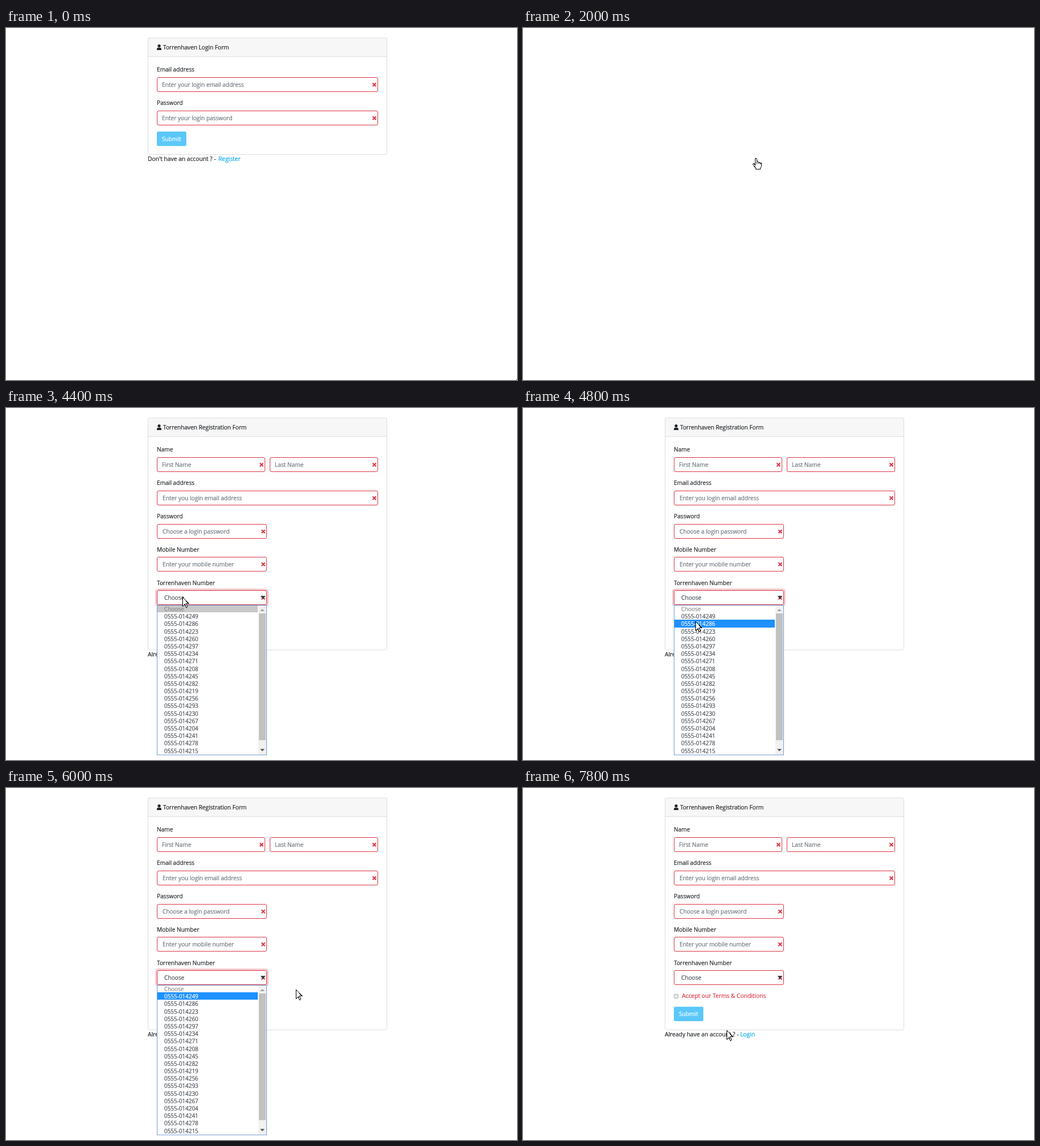
An HTML page that plays this animation: 901 by 622 pixels, repeating every 8000 ms.

```html
<!DOCTYPE html>
<html lang="en">
<head>
<meta charset="utf-8">
<title>Login and registration</title>
<style>
html, body { margin: 0; width: 100%; height: 100%; overflow: hidden; background: #fff; }
svg { display: block; }
text {
  font: 10.2px "Open Sans", "Noto Sans", sans-serif; white-space: pre;
  color: #212529; fill: currentColor; stroke: currentColor; stroke-width: .2px;
}
.card { fill: #fff; stroke: #dfdfdf; }
.head { fill: #f7f7f7; stroke: #dfdfdf; }
.field { fill: #fff; stroke: #dc3545; }
.cross { fill: none; stroke: #dc3545; stroke-width: 2; }
.hint { color: #6c757d; }
.value { color: #495057; }
.error { color: #dc3545; font-size: 10.3px; }
.link { color: #03a9f4; font-size: 10.3px; }
.link.hover { color: #0275a8; text-decoration: underline; }
.foot { font-size: 10.3px; }
.button { fill: #5bc7fa; }
.button + text { color: #fff; }
.ring { fill: none; stroke: #dc3545; stroke-opacity: .25; stroke-width: 3; }
.row text { color: #495057; font-size: 9.95px; }
.row rect { fill: none; }
.row.first text { color: #8a8a8a; }
.row.on rect { fill: #1e90ff; }
.row.on text { color: #fff; }
.row.first.on rect { fill: #c8c8c8; }
.row.first.on text { color: #8a8a8a; }
.pointer path { fill: #fff; stroke: #000; stroke-linejoin: round; shape-rendering: crispEdges; }
.pointer .line { fill: none; }
</style>
</head>
<body>
<svg id="stage" width="901" height="622" viewBox="0 0 901 622"></svg>
<script>
const BRAND = 'Torrenhaven';
const LOOP = 8000, STEP = 200;
const ROW_TOP = 348.52, ROW_HEIGHT = 13.1875, ROWS = 20;

const text = (x, y, s, cls = '') => `<text x="${x}" y="${y}" class="${cls}">${s}</text>`;
const rect = (x, y, w, h, cls, r = 0) =>
  `<rect x="${x}" y="${y}" width="${w}" height="${h}" rx="${r}" class="${cls}"/>`;
const cross = (x, y) => `<path class="cross" d="M${x - 3} ${y - 3}l6 6m0-6l-6 6"/>`;

const card = (bottom, title) =>
  rect(250.5, 17.5, 421, bottom - 17.5, 'card', 3) +
  '<path class="head" d="M250.5 50.5V20.5q0-3 3-3H668.5q3 0 3 3V50.5Z"/>' +
  '<circle cx="270" cy="31.6" r="2.6" fill="#212529"/>' +
  '<path d="M266 39v-1.6q0-2.6 2.6-2.6h2.8q2.6 0 2.6 2.6V39Z" fill="#212529"/>' +
  text(277, 38, `${BRAND} ${title} Form`);

const field = (x, y, right, hint, indent = 10, cls = 'hint') =>
  rect(x + .5, y + .5, right - x - 1 + .5 * 0, 25, 'field', 2.5) +
  text(x + indent, y + 17, hint, cls) + cross(right - 6.5, y + 13.2);

const button = y => rect(266, y, 52, 25.5, 'button', 2.5) + text(275, y + 16.5, 'Submit');

const login =
  card(223.5, 'Login') +
  text(266, 77, 'Email address') + field(266, 87, 656, 'Enter your login email address', 9) +
  text(266, 136, 'Password') + field(266, 146, 656, 'Enter your login password', 9) +
  button(183) +
  text(250, 235, "Don't have an account ? -", 'foot') +
  '<text id="register" x="374.5" y="235" class="link">Register</text>';

const registration =
  card(427.5, 'Registration') +
  text(266, 77, 'Name') + field(266, 87, 457, 'First Name', 9) + field(465, 87, 656, 'Last Name', 9) +
  text(266, 136, 'Email address') + field(266, 146, 656, 'Enter you login email address') +
  text(266, 195, 'Password') + field(266, 205, 460, 'Choose a login password') +
  text(266, 254, 'Mobile Number') + field(266, 263, 460, 'Enter your mobile number') +
  text(266, 313, `${BRAND} Number`) +
  '<g id="focus">' + rect(264.5, 320.5, 197, 29, 'ring', 4) + '</g>' +
  field(266, 322, 460, 'Choose', 13, 'value') +
  '<path d="M449 332h8l-4 6z" fill="#343a40"/>' +
  '<rect x="266.5" y="364.5" width="7" height="7" rx="1" fill="#e8e8e8" stroke="#a9a9a9"/>' +
  text(280.3, 371, 'Accept our Terms &amp; Conditions', 'error') +
  button(386.5) +
  text(250, 439, 'Already have an account ? -', 'foot') + text(383, 439, 'Login', 'link');

const number = i => '0555-014' + (200 + (i * 37 + 12) % 100);
const rowTop = i => Math.floor(ROW_TOP + i * ROW_HEIGHT);
const row = i => {
  const y = rowTop(i);
  return `<g class="row ${i ? '' : 'first'}">` + rect(267, y, 177, rowTop(i + 1) - y, '') +
    text(279, y + 11, i ? number(i) : 'Choose') + '</g>';
};
const list =
  '<path d="M266 348h194v265.5h-194z" fill="#fff"/>' +
  Array.from({ length: ROWS }, (_, i) => row(i)).join('') +
  '<path d="M445 349h14v263.5h-14z" fill="#f1f1f1"/>' +
  '<path d="M446 363h12v224h-12z" fill="#c1c1c1"/>' +
  '<path d="M448 359h8l-4-4z" fill="#a3a3a3"/><path d="M448 602.5h8l-4 4z" fill="#505050"/>' +
  '<rect x="266.5" y="348.5" width="193" height="264.5" fill="none" stroke="#6f9ad6"/>';

const pointers = {
  arrow: '<path d="M.5.5V16.2L4.2 12.7 6.7 18.5 9 17.5 6.5 11.8H11.3Z"/>',
  hand: '<path d="M4.5 12.5V1.8Q4.5.5 5.7.5T7 1.8V6.4Q9.7 5.2 10 7.4 12.6 6.3 13 8.5 15.5 7.6 15.5 10V14L13.8 17.3V19.5H5.8V17.8L1.2 12.3Q-.2 10.2 1.4 9.7T4.5 12.5Z"/>' +
    '<path class="line" d="M7 6.4V10M10 7.4V10.4M13 8.5V11"/>',
  beam: '<path class="line" d="M-3-6.5h2l1 1 1-1h2M0-5.5v11M-3 6.5h2l1-1 1 1h2"/>'
};

document.getElementById('stage').innerHTML =
  `<g id="login">${login}</g><g id="registration">${registration}</g><g id="list">${list}</g>` +
  Object.entries(pointers).map(([k, d]) => `<g id="${k}" class="pointer">${d}</g>`).join('');

// Pointer path: time, x, y, shape; each pose holds until the next.
const path = [
  [0, 900, 621, 'arrow'], [200, 846, 574, 'arrow'], [400, 712, 458, 'arrow'],
  [600, 546, 322, 'arrow'], [800, 432, 248, 'arrow'],
  [1000, 405, 229, 'hand'], [1400, 405, 230, 'hand'],
  [2600, 372, 160, 'beam'], [2800, 330, 74, 'arrow'], [3000, 316.5, 43, 'beam'],
  [3200, 313, 11, 'arrow'], [3400, 311.5, 160, 'beam'], [3600, 311, 334, 'arrow'],
  [4600, 309, 346, 'arrow'], [4800, 304, 377, 'arrow'], [5000, 301, 391, 'arrow'],
  [5200, 300, 402, 'arrow'], [5400, 302, 437, 'arrow'], [5600, 345, 404, 'arrow'],
  [5800, 430, 368, 'arrow'], [6000, 511, 356, 'arrow'], [6400, 506, 345, 'arrow'],
  [6600, 466, 196, 'arrow'], [6800, 378, 69, 'arrow'], [7000, 272, 186, 'arrow'],
  [7200, 237, 340, 'arrow'], [7400, 268, 392, 'arrow'], [7600, 332, 424, 'arrow'],
  [7800, 359, 428, 'arrow']
];

const el = id => document.getElementById(id);
const rows = [...document.querySelectorAll('.row')];
const show = (id, on) => { el(id).style.display = on ? '' : 'none'; };
const between = (t, a, b) => t >= a && t < b;

// The list keeps the last row the pointer passed over.
function activeRow(t) {
  const over = path.filter(([at, x, y]) => between(at, 4000, t + 1) && x < 445 && y > ROW_TOP);
  return over.length ? Math.floor((over.at(-1)[2] - ROW_TOP) / ROW_HEIGHT) : 0;
}

function draw(t) {
  show('login', t < 2000);
  show('registration', t >= 2200);
  show('focus', between(t, 3800, 6400));
  show('list', between(t, 4000, 6400));
  el('register').classList.toggle('hover', between(t, 1000, 2000));
  const active = activeRow(t);
  rows.forEach((r, i) => r.classList.toggle('on', i === active));
  const [, x, y, shape] = path.findLast(p => p[0] <= t);
  for (const k in pointers) show(k, k === shape);
  el(shape).setAttribute('transform', `translate(${x} ${y})`);
}

const start = performance.now();
let last = -1;
function tick() {
  const t = Math.floor((performance.now() - start) % LOOP / STEP) * STEP;
  if (t !== last) draw(last = t);
  requestAnimationFrame(tick);
}
tick();
</script>
</body>
</html>
```
